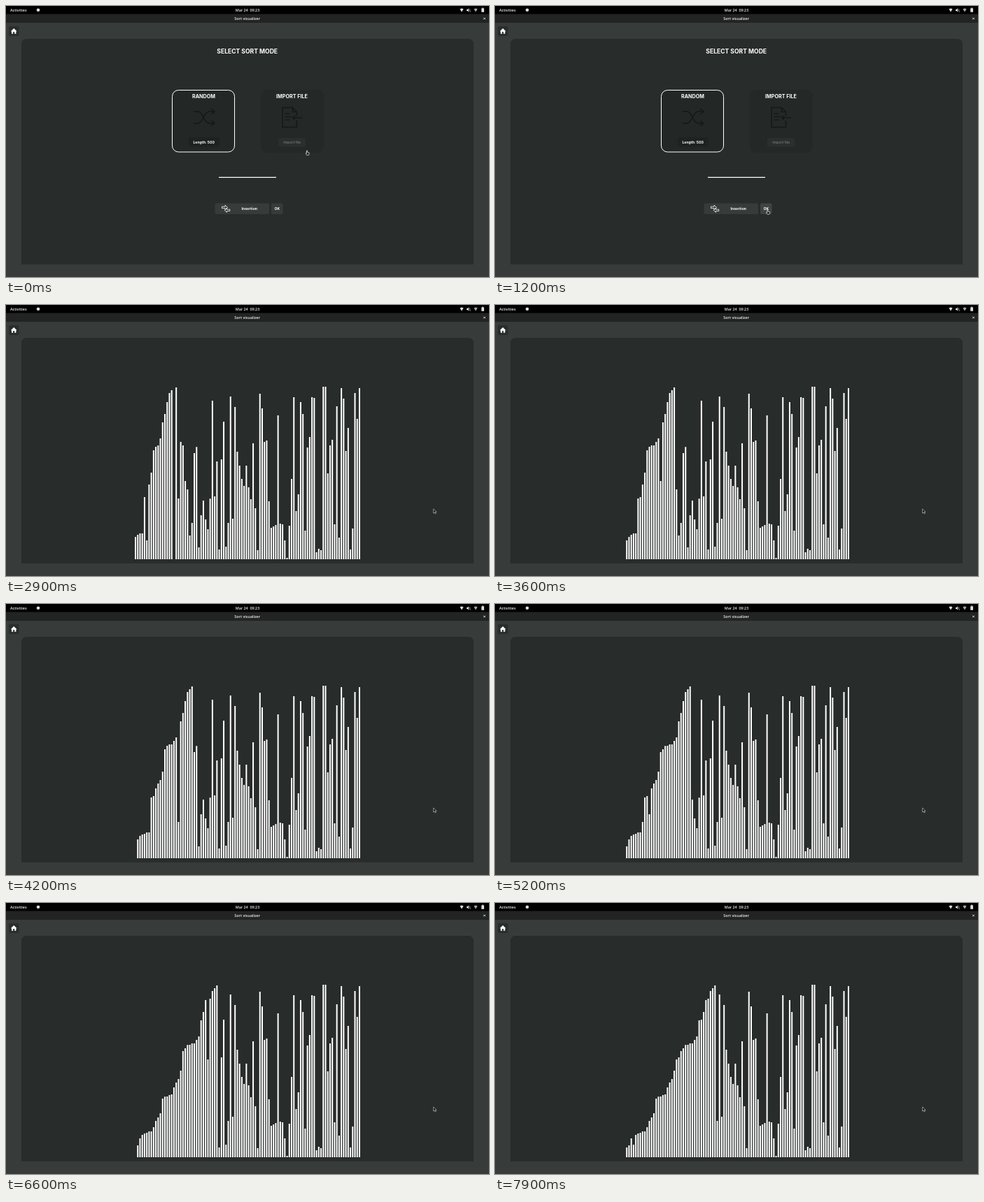
Write an HTML page that moves like this. It is 690 by 388 pixels and loops after 8 s.

```html
<!DOCTYPE html>
<html lang="en">
<head>
<meta charset="utf-8">
<title>Sort visualizer</title>
<style>
  html, body { margin: 0; width: 100%; height: 100%; overflow: hidden; background: #373b39; }
  svg { display: block; width: 100%; height: 100%; }
  text { font-family: Inter, sans-serif; font-weight: 700; fill: #fff; text-anchor: middle; }
  .system { font-family: "Open Sans", "Noto Sans", sans-serif; font-weight: 600; font-size: 5.4px; fill: #eee; }
  .left { text-anchor: start; }
  .small { font-size: 5.15px; }
  .card { font-size: 7.2px; }
  .line { fill: none; stroke: #fff; }
  .dark { fill: none; stroke: #151917; stroke-width: 1.6; }
</style>
</head>
<body>
<svg viewBox="0 0 690 388">
  <rect width="690" height="388" fill="#373b39"/>
  <rect width="690" height="24" fill="#222423"/>
  <rect width="690" height="11.5" fill="#000"/>
  <text class="system left" x="6" y="7.8">Activities</text>
  <circle cx="46" cy="5.8" r="2.3" fill="#ddd"/>
  <text class="system" x="345" y="7.8" xml:space="preserve">Mar 24  09:23</text>
  <text class="system" x="344.7" y="20">Sort visualizer</text>
  <path class="line" d="M682.2 16.7l2.6 2.6m0-2.6l-2.6 2.6" stroke-width=".8"/>

  <g fill="#ddd">
    <path d="M648.5 4.5q2.5-2 5 0L651 8.5z"/>
    <path d="M658 4.9h1.3L661 3.2v5.4L659.300 6.900H658z"/>
    <path d="M662 4q1.500 1.900 0 3.800" fill="none" stroke="#ddd" stroke-width=".7"/>
    <circle cx="663.300" cy="8" r=".6"/>
    <path d="M668.500 4.500q2.500-2 5 0L671 8.500z" opacity=".75"/>
    <rect x="679.200" y="3.200" width="3.800" height="5.600" rx=".6"/>
    <rect x="680.300" y="2.500" width="1.600" height="1"/>
  </g>

  <rect x="4" y="29" width="14.500" height="14" rx="2" fill="#292d2b"/>
  <path d="M6.800 36.200L11.200 32l4.400 4.200h-1.200V39.800h-2.200V37h-2v2.800H8V36.200z" fill="#fff"/>
  <path d="M22 370V55q0-8 8-8h630q8 0 8 8v315z" fill="#282c2a"/>

  <g id="menu">
    <text x="344.700" y="68.100" font-size="8.6">SELECT SORT MODE</text>

    <rect x="237.500" y="120.500" width="89" height="88.500" rx="9" fill="#232725" stroke="#fff"/>
    <text class="card" x="282.500" y="132.200">RANDOM</text>
    <path class="dark" stroke-width="2.500" d="M268 151h6q4 0 8 8.500t9 8.500h6M268 168h6q4 0 8-8.500t9-8.500h6M293 147l5 4-5 4M293 164l5 4-5 4"/>
    <rect x="261" y="188" width="44" height="13.500" rx="3" fill="#1e2220"/>
    <text class="small" x="282.700" y="196.900">Length: 500</text>

    <rect x="364" y="120" width="90" height="90" rx="9" fill="#242826"/>
    <text class="card" x="408.500" y="132.200">IMPORT FILE</text>
    <path class="dark" d="M415.500 157v-5.500l-6-6H395v28h20.500V164M409.500 145.500v6h6M398.500 154h7M398.500 158.500h9M398.500 163h7M423 160h-13M413 157l-3.500 3 3.500 3"/>
    <rect x="389" y="189" width="39" height="12.500" rx="3" fill="#2b2f2d"/>
    <text class="small" x="408.700" y="196.900" style="font-weight:400;fill:#858886">Import file</text>

    <path class="line" d="M304 245.400h82" stroke-width="1.300"/>
    <rect x="298.500" y="282.500" width="77.500" height="15.500" rx="2" fill="#373b39"/>
    <path class="line" stroke-width=".8" d="M308.500 287.200h4.500v-2l3.500 3.200-3.500 3.200v-2h-4.500zM319.800 291.200h-4.300v-1.800l-3.300 3 3.300 3v-1.800h4.300z"/>
    <text class="small" x="347.800" y="291.900">Insertion</text>
    <rect id="ok" x="379" y="282.500" width="16.500" height="15.500" rx="2" fill="#373b39"/>
    <text class="small" x="387.300" y="291.900">OK</text>
  </g>

  <path id="bars" fill="#fff"/>
  <g id="cursor">
    <path id="arrow" d="M0 0v6l1.500-1.300 1.100 2.200 1-.5-1-2.100h1.800z" fill="#111" stroke="#ddd" stroke-width=".6"/>
    <path id="hand" d="M-.6 0h1v2.300l2.700.7v2L2.300 6.500h-2.700L-2 4l.6-.6.800.600z" fill="#222" stroke="#eee" stroke-width=".7"/>
  </g>
</svg>
<script>
const LOOP = 8000, STEP = 100, SORT_START = 1900;
const BASE = 364, FIRST_X = 184, PITCH = 3.232;

// Top edge of each bar before sorting
const tops = [
  191, 156, 139, 257, 203, 329, 327, 122, 208, 327, 240, 332, 275, 201, 126, 168, 337, 364, 118, 277,
  196, 201, 252, 264, 330, 312, 212, 203.3, 347, 301, 280, 307, 321, 277.3, 137, 274, 224, 350, 221, 167,
  346, 312, 131, 306, 146, 210, 230, 249, 259, 230, 261, 278, 198, 291, 351, 127, 148, 196, 194, 281,
  319, 317, 315, 158, 313, 314, 337, 362, 316, 249, 132, 295, 271, 139, 156, 323, 204, 189, 132, 133,
  354, 349, 351, 117, 117, 241, 201, 193, 314, 145, 333, 119, 134, 209, 176, 350, 320, 126, 163, 119
];

// Cursor stops: time, x, y
const stops = [
  [0, 430, 207], [200, 430, 207], [400, 410, 220], [500, 410, 220],
  [1300, 388.5, 295], [2000, 388.5, 295], [2700, 610.7, 292]
];

const el = id => document.getElementById(id);
const show = (id, on) => el(id).style.display = on ? '' : 'none';

// Insertion sort by neighbour swaps, halted after the given number of swaps
function sortedAfter(swaps) {
  const a = tops.slice();
  for (let i = 1; i < a.length; i++) {
    for (let j = i; j > 0 && a[j] > a[j - 1]; j--) {
      if (swaps-- <= 0) return a;
      [a[j - 1], a[j]] = [a[j], a[j - 1]];
    }
  }
  return a;
}

function cursorAt(t) {
  const next = stops.findIndex(s => s[0] > t);
  if (next < 0) return stops[stops.length - 1].slice(1);
  const [t0, x0, y0] = stops[next - 1], [t1, x1, y1] = stops[next];
  const u = (t - t0) / (t1 - t0), k = u * u * (3 - 2 * u);
  return [x0 + (x1 - x0) * k, y0 + (y1 - y0) * k];
}

function draw(t) {
  const sorting = t >= SORT_START;
  const overOk = t >= 1200 && !sorting;
  show('menu', !sorting);
  show('bars', sorting);
  el('ok').setAttribute('fill', overOk ? '#404442' : '#373b39');

  if (sorting) {
    const swaps = Math.max(0, Math.floor((t - 1993) * 0.08075));
    el('bars').setAttribute('d', sortedAfter(swaps).map((top, i) =>
      `M${(FIRST_X + i * PITCH).toFixed(2)} ${BASE}V${top}h2V${BASE}z`).join(''));
  }

  const hand = t < 300 || overOk;
  show('hand', hand);
  show('arrow', !hand);
  el('cursor').setAttribute('transform', `translate(${cursorAt(t)})`);
}

function tick() {
  const t = performance.now() % LOOP;
  draw(Math.floor(t / STEP) * STEP);
  requestAnimationFrame(tick);
}
tick();
</script>
</body>
</html>
```
